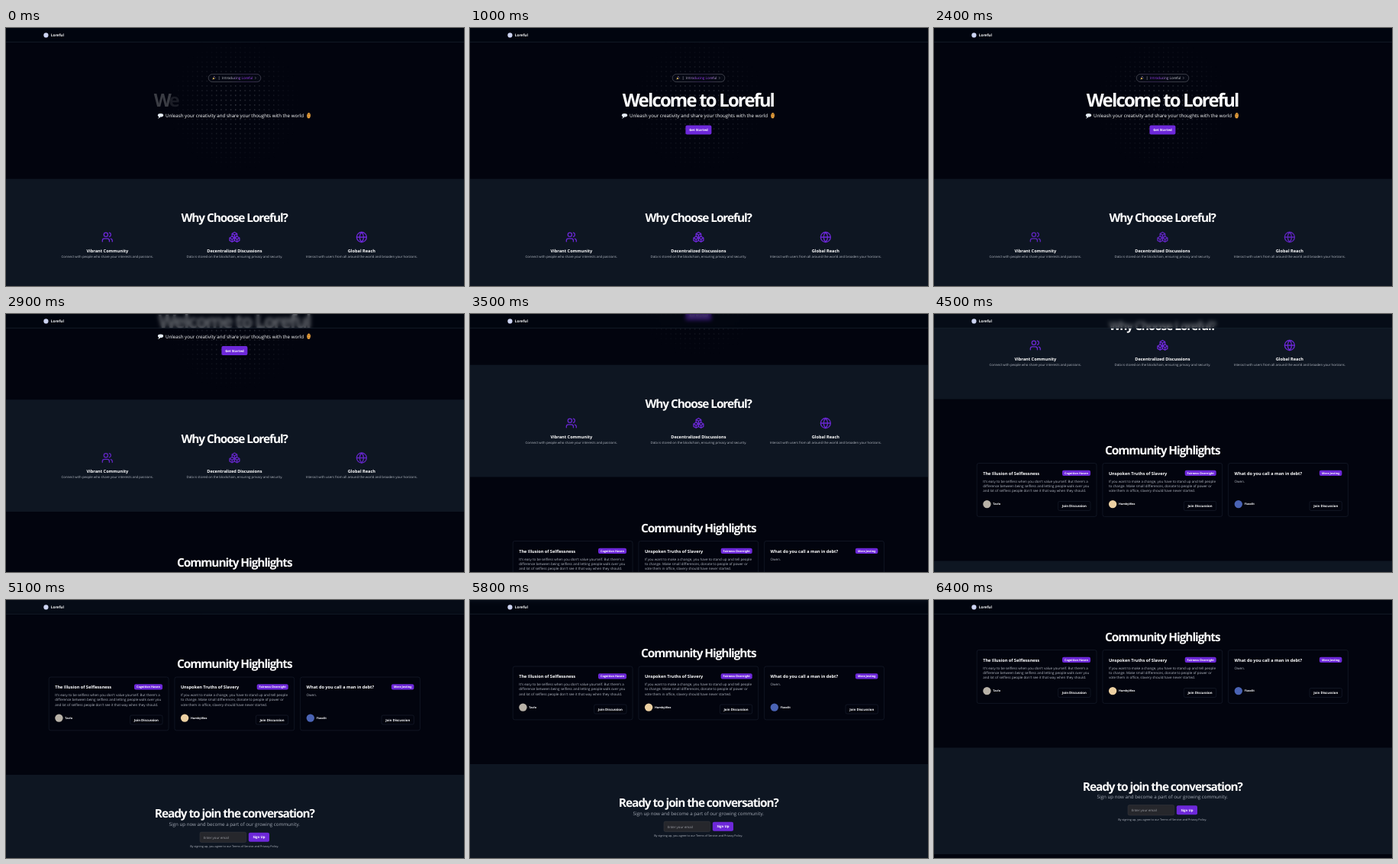
These frames come from a looping animation (600 px wide and 338 px high, 6.5 s). An HTML page:

```html
<!DOCTYPE html>
<html lang="en">
<head>
<meta charset="utf-8">
<title>Loreful</title>
<style>
  html, body { margin: 0; width: 100%; height: 100%; overflow: hidden; background: #02040e; }
  svg { display: block; width: 100%; height: 100%; }
  text { font-family: "Open Sans", "Noto Sans", sans-serif; fill: #fff; white-space: pre; text-rendering: geometricPrecision; }
  .mid { text-anchor: middle; }
  .hero { font-size: 23.8px; font-weight: 700; letter-spacing: -.074em; }
  .head { font-size: 15.4px; font-weight: 700; letter-spacing: -.069em; }
  .lead { font-size: 6.18px; }
  .sub { font-size: 6.22px; fill: #a3a9b4; }
  .title { font-size: 5.58px; font-weight: 700; }
  .desc { font-size: 4.3px; fill: #b6bbc5; }
  .body { font-size: 4.51px; fill: #b6bbc5; }
  .brand { font-size: 4.8px; font-weight: 700; }
  .btn { font-size: 4.3px; font-weight: 700; }
  .badge { font-size: 3.75px; font-weight: 700; }
  .user { font-size: 3.75px; font-weight: 700; }
  .fine { font-size: 3.74px; fill: #b6bbc5; }
  .intro { font-size: 4.56px; fill: url(#shine); }
  .field { font-size: 4.3px; fill: #a0a2a9; }
  .icon { fill: none; stroke: #6d28d9; stroke-width: 2; stroke-linecap: round; stroke-linejoin: round; }
  .line { fill: none; stroke: #1e2737; stroke-width: .5; }
  .violet { fill: #6d28d9; }
  header {
    position: fixed; top: 0; left: 0; width: 100%; height: 5.55%;
    background: rgba(3, 7, 17, .6);
    backdrop-filter: blur(2.4px);
  }
</style>
</head>
<body>
<svg id="stage" viewBox="0 0 600 338" preserveAspectRatio="none"></svg>
<header><svg id="bar" viewBox="0 0 600 18.75" preserveAspectRatio="none"></svg></header>
<script>
const LOOP = 6500, STEP = 100;
const BRAND = 'Loreful';
const GREETING = 'Welcome to ' + BRAND;

const text = (x, y, cls, str) => `<text x="${x}" y="${y}" class="${cls}">${str}</text>`;
const rect = (x, y, w, h, r, attrs) =>
  `<rect x="${x}" y="${y}" width="${w}" height="${h}" rx="${r}" ${attrs}/>`;
const dot = (x, y, r, fill) => `<circle cx="${x}" cy="${y}" r="${r}" fill="${fill}"/>`;
const path = d => `<path d="${d}"/>`;

const cube = (x, y) => path(
  `M${x} ${y - 6}l5 3v5.2l-5 3l-5-3v-5.2zm-5 3l5 3l5-3m-5 3v5.2`);

const icons = {
  users: '<circle cx="9" cy="7" r="4"/>' +
    path('M16 21v-2a4 4 0 0 0-4-4H6a4 4 0 0 0-4 4v2M22 21v-2a4 4 0 0 0-3-3.87M16 3.13a4 4 0 0 1 0 7.75'),
  boxes: cube(12, 8) + cube(7, 16.5) + cube(17, 16.5),
  globe: '<circle cx="12" cy="12" r="10"/>' +
    path('M12 2a14.5 14.5 0 0 0 0 20a14.5 14.5 0 0 0 0-20M2 12h20')
};

const features = [
  [132.8, 'users', 'Vibrant Community', 'Connect with people who share your interests and passions.'],
  [299.4, 'boxes', 'Decentralized Discussions', 'Data is stored on the blockchain, ensuring privacy and security.'],
  [465.9, 'globe', 'Global Reach', 'Interact with users from all around the world and broaden your horizons.']
];

const cards = [
  { title: 'The Illusion of Selflessness', badge: 'Cognition Haven', badgeW: 37, user: 'Tavlo', avatar: '#b8b2a8',
    lines: ["It's easy to be selfless when you don't value yourself. But there's a",
      'difference between being selfless and letting people walk over you',
      "and lot of selfless people don't see it that way when they should."] },
  { title: 'Unspoken Truths of Slavery', badge: 'Fairness Overnight', badgeW: 41, user: 'HumbyWex', avatar: '#ecd0a2',
    lines: ['If you want to make a change, you have to stand up and tell people',
      'to change. Make small differences, donate to people of power or',
      'vote them in office, slavery should have never started.'] },
  { title: 'What do you call a man in debt?', badge: 'Mere Jesting', badgeW: 29.5, user: 'Fizzolit', avatar: '#4a63b4',
    lines: ['Owen.'] }
];

const defs = `<defs>
  <pattern id="dots" width="6.25" height="6.25" patternUnits="userSpaceOnUse">${dot(.8, .8, .5, '#8b8f99')}</pattern>
  <radialGradient id="glow" gradientUnits="userSpaceOnUse" cx="300" cy="100" r="88">
    <stop offset="0" stop-color="#fff"/><stop offset="1" stop-color="#fff" stop-opacity="0"/>
  </radialGradient>
  <mask id="fade" maskUnits="userSpaceOnUse" x="0" y="0" width="600" height="198">
    <rect width="600" height="198" fill="url(#glow)"/>
  </mask>
  <linearGradient id="shine" gradientUnits="userSpaceOnUse" x1="-22" x2="22" y1="0" y2="0">
    <stop offset="0" stop-color="#c4c5cc"/><stop offset=".4" stop-color="#9333ea"/>
    <stop offset=".6" stop-color="#9333ea"/><stop offset="1" stop-color="#c4c5cc"/>
  </linearGradient>
</defs>`;

const balloon = '<g fill="#e6edf4"><ellipse cx="202.5" cy="114.3" rx="3.6" ry="2.3"/>' +
  '<circle cx="201" cy="116.7" r="1"/><circle cx="199.7" cy="118" r=".5"/></g>';
const hand = '<path d="M394.2 114l1-2.3l1.2-.6l1.7.5l.9 2.4l-.4 2.6l-1 1.7h-2.2l-1-1.7z" fill="#f0a640"/>' +
  '<path d="M395.8 112v2.4M397.3 112v2.4M395.2 116h2.4" stroke="#6b4010" stroke-width=".5"/>';
const popper = '<path d="M270.4 67.6l1.2-3.2l2 2z" fill="#d9b45c"/>' +
  dot(273.2, 64, .5, '#c77bd8') + dot(274.4, 65.4, .45, '#7fb2e8') + dot(272.4, 63.4, .4, '#e8e8ee');

const pill = rect(265.2, 60.4, 68.6, 10.2, 5.1, 'fill="#060914" stroke="#3c3e4a" stroke-width=".5"') +
  rect(265.2, 60.4, 68.6, 10.2, 5.1, 'fill="none" stroke="url(#shine)" stroke-width=".5" opacity=".3"') +
  popper + '<path d="M279.2 63.2v4.8" stroke="#9a9ca6" stroke-width=".5"/>' +
  text(283, 67.2, 'intro', 'Introducing ' + BRAND) +
  '<path d="M326.2 64.2l1.2 1.3l-1.2 1.3" fill="none" stroke="#a5a6ae" stroke-width=".5"/>';

const hero = '<rect width="600" height="197.5" fill="url(#dots)" mask="url(#fade)"/>' + pill +
  `<text x="199.8" y="103.2" class="hero" id="greeting">${[...GREETING].map(c => `<tspan>${c}</tspan>`).join('')}</text>` +
  balloon + hand +
  text(299.5, 117.2, 'lead mid', 'Unleash your creativity and share your thoughts with the world') +
  '<g id="start">' + rect(282.4, 127.5, 34, 12, 2, 'class="violet"') +
  text(299.4, 135.1, 'btn mid', 'Get Started') + '</g>';

const why = '<rect y="197.7" width="600" height="146.8" fill="#0e1622"/>' +
  text(299.2, 254, 'head mid', `Why Choose ${BRAND}?`) +
  features.map(([x, icon, title, desc]) =>
    `<g class="icon" transform="translate(${x - 7.8} 266.2) scale(.65)">${icons[icon]}</g>` +
    text(x, 293.8, 'title mid', title) + text(x, 300.9, 'desc mid', desc)).join('');

const card = (c, i) => `<g transform="translate(${56.2 + i * 164.7} 428.5)">` +
  rect(0, 0, 156.8, 69.9, 2.5, 'class="line"') +
  text(8, 15.1, 'title', c.title) +
  rect(148.8 - c.badgeW, 9.3, c.badgeW, 7.3, 2, 'class="violet"') +
  text(148.8 - c.badgeW / 2, 14.3, 'badge mid', c.badge) +
  c.lines.map((line, n) => text(8, 25 + n * 6.4, 'body', line)).join('') +
  dot(13.2, 53.6, 5.2, c.avatar) +
  text(21.1, 54.9, 'user', c.user) +
  rect(106.4, 50, 42.4, 12, 2, 'class="line"') +
  text(127.6, 57.6, 'btn mid', 'Join Discussion') + '</g>';

const highlights = text(299.3, 416.8, 'head mid', 'Community Highlights') + cards.map(card).join('');

const join = '<rect y="556.5" width="600" height="139.5" fill="#0e1622"/>' +
  text(299.3, 612.8, 'head mid', 'Ready to join the conversation?') +
  text(299.3, 623.4, 'sub mid', 'Sign up now and become a part of our growing community.') +
  rect(254, 631.6, 60.7, 13.4, 2, 'fill="#26272c" stroke="#383a41" stroke-width=".5"') +
  text(258.8, 640, 'field', 'Enter your email') +
  rect(317.8, 632.2, 27.2, 12, 2, 'class="violet"') +
  text(331.4, 639.8, 'btn mid', 'Sign Up') +
  text(299.2, 651.9, 'fine mid', 'By signing up, you agree to our Terms of Service and Privacy Policy.');

const $ = id => document.getElementById(id);
$('stage').innerHTML = defs + `<g id="page">${hero + why + highlights + join}</g>`;
$('bar').innerHTML = dot(52.4, 9.4, 3.1, '#cdd4f2') + text(58.8, 11.1, 'brand', BRAND) +
  '<path d="M0 18.4h600" stroke="#1f2937" stroke-width=".6"/>';

const page = $('page'), start = $('start'), shine = $('shine');
const letters = [...$('greeting').children];
const featureIcons = document.querySelectorAll('.icon');

// Scroll offset over time: [ms, px]
const scroll = [[2500, 0], [2700, 14], [2800, 44], [2900, 85.5], [3000, 106], [3200, 119], [3500, 131],
  [3600, 143], [3800, 186], [4000, 214], [4200, 226], [4400, 226], [4500, 233], [4700, 274],
  [4900, 311], [5100, 327.5], [5600, 327.5], [5700, 333], [5900, 350], [6100, 360], [6300, 363]];

function scrollAt(t) {
  const n = scroll.findIndex(k => k[0] > t);
  if (n === 0) return 0;
  if (n < 0) return scroll[scroll.length - 1][1];
  const [t0, a] = scroll[n - 1], [t1, b] = scroll[n];
  return a + (b - a) * (t - t0) / (t1 - t0);
}

const easeOut = p => 1 - Math.pow(1 - Math.min(1, Math.max(0, p)), 1.7);
const SLIDE = 7.8, FADE = 500;

function draw(t) {
  page.setAttribute('transform', `translate(0 ${-scrollAt(t)})`);

  // Letters slide in from the left one after another
  let last = 0;
  letters.forEach((el, i) => {
    const p = easeOut((t + 70 - i * 40) / FADE);
    const shift = -SLIDE * (1 - p);
    el.setAttribute('dx', shift - last);
    el.setAttribute('fill-opacity', p);
    last = shift;
  });

  const p = easeOut(t / FADE);
  start.setAttribute('opacity', p);
  start.setAttribute('transform', `translate(0 ${SLIDE * (1 - p)})`);

  shine.setAttribute('gradientTransform', `translate(${315 - t * .0106} 0)`);

  const dim = t < 700 ? 0 : Math.sin(Math.PI * (t - 700) / 3400) ** 2;
  featureIcons.forEach(el => el.setAttribute('opacity', 1 - .15 * dim));
}

const t0 = performance.now();
function tick() {
  const t = (performance.now() - t0) % LOOP;
  draw(Math.floor(t / STEP) * STEP);
  requestAnimationFrame(tick);
}
tick();
</script>
</body>
</html>
```
